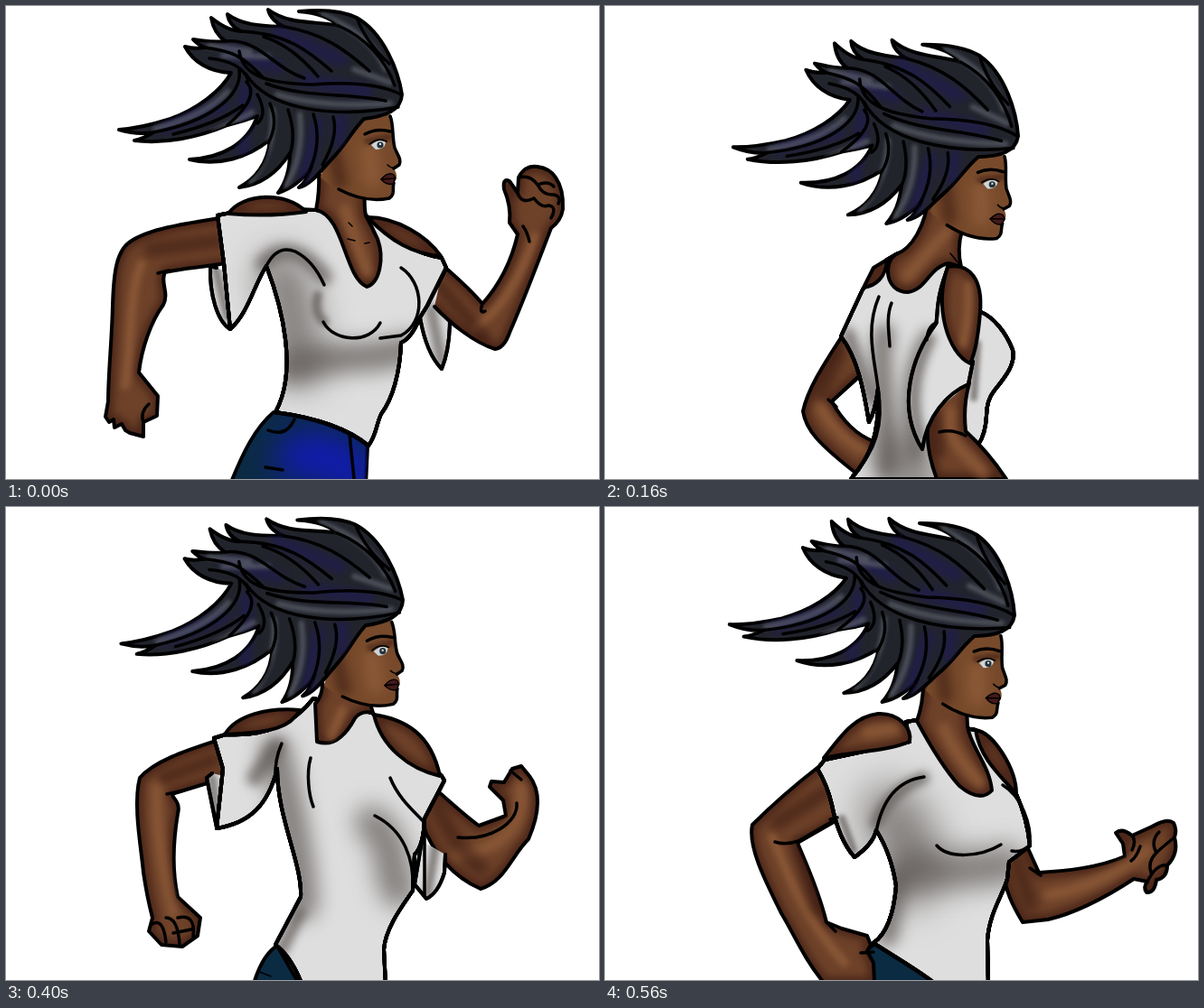
Animation, 656 px wide and 524 px high, one loop 0.64 s. Source, as an HTML page with a canvas:

```html
<!DOCTYPE html>
<html lang="en">
<head>
<meta charset="utf-8">
<title>Runner</title>
<style>
html, body { margin: 0; width: 100%; height: 100%; overflow: hidden; background: #fff; }
canvas { display: block; }
</style>
</head>
<body>
<canvas id="stage" width="656" height="524"></canvas>
<script>
const W = 656, H = 524, STEP = 80;
const stage = document.getElementById('stage').getContext('2d');

// Part codes: s skin, f face, w shirt, b jeans, n hair, l line, t thin line, v eye, r lips;
// shades g grey, h skin glow, d skin shadow, u blue, k violet, m sheen are clipped to the part before them.
const FILL = { s: '#6e4229', f: '#774a2b', w: '#dedede', b: '#0b2b43', n: '#22242c', r: '#45191a' };
const SHADE = { g: '#5d5855', h: '#95603c', d: '#32150f', u: '#1515df', k: '#221c55', m: '#62656f' };

const highArm = `sM484,288C500,302 516,316 527,330C543,312 558,288 566,253L557,240Q559,222 551,203Q549,190 557,194L566,207L567,190Q574,176 588,178Q602,180 608,190Q617,203 616,225Q614,238 603,246C592,275 572,328 557,362Q551,379 541,380C518,373 492,352 474,333
h9M520,355C545,340 570,300 585,255
d14M480,310L530,368
lM527,330Q523,342 530,338
lM566,207Q570,220 584,213M568,190Q580,187 588,198Q600,193 606,200M588,198Q594,210 606,209Q615,211 611,219M584,213Q592,224 600,221Q610,222 603,235M572,244Q577,251 579,261`;
const backArm = `sM236,235C205,240 160,246 139,260C122,270 119,295 118,332C117,372 113,408 113,438L110,455L114,461L119,458L120,467L128,463L132,470L137,473L152,477L152,461L167,454L168,432L147,406C150,380 160,350 174,331C181,318 170,305 176,295C196,290 215,290 242,285
h10M150,285C135,320 140,370 132,420
d16M160,270L235,260
lM168,296L180,293M152,461Q148,450 158,441`;

const frontReach = `bM248,530C262,495 275,468 296,450C335,455 375,467 400,487L398,530
u55M325,500Q360,490 385,520
lM290,470Q310,478 319,458M380,474L385,524M287,511L306,514
wM458,345C462,368 470,390 482,402C493,375 493,340 487,290
g12M470,335L482,395
${highArm}
${backArm}
wM233,290L226,288C225,320 234,350 248,358L258,300
g10M232,290L245,345
wM234,232C260,225 310,225 343,226L398,232C425,258 455,275 482,279L487,290L466,332L458,345C452,360 444,370 437,373C436,405 428,435 415,452C409,465 410,475 401,487C375,465 335,455 298,450C323,405 306,335 288,288C274,310 268,340 248,358L241,285Z
g54M305,300C325,350 318,385 325,395
g34M315,400C350,385 410,394 445,380
g18M285,285Q315,255 352,300
g10M352,350Q340,340 345,320
lM288,288Q300,264 320,272Q340,282 352,309M351,350C362,372 402,375 414,351M437,290C462,306 465,350 437,365L414,368
sM246,230C262,207 310,205 332,228Q290,234 246,230
sM400,234C432,234 466,255 481,277C450,275 425,260 400,234
sM346,185C347,205 345,216 343,226C374,232 374,300 399,311C413,307 419,280 411,258Q405,245 398,232Q396,222 397,208
h12M375,225Q385,260 400,295
tM379,240L383,244M378,258L386,260M397,263L402,262`;

const frontLift = `bM250,530C260,505 270,492 280,485L372,530
lM275,513Q295,518 304,500
sM470,320C485,340 497,355 505,362L510,342C515,326 535,325 546,340C556,355 559,372 557,385C556,405 548,425 535,440C505,438 475,415 458,384
d18M465,340Q490,400 530,430
lM505,362L492,355Q485,370 495,386Q510,412 549,411M512,346Q528,333 520,360M525,342Q544,345 530,375M545,350Q556,362 536,384M508,362L512,372M516,400Q516,414 530,421
h8M515,390Q540,390 545,365
sM234,270C205,283 165,302 147,313C138,325 142,370 150,405C158,440 170,460 178,485Q190,510 207,527L232,527C240,505 245,490 240,480L226,464L210,458L203,450C195,420 187,370 194,345Q200,332 242,318
h12M168,330C165,380 180,440 212,490
d16M175,320L230,295M180,445L200,490
lM215,497Q228,488 237,505M226,464L229,472
wM235,310L230,320L231,350L242,373L255,320
g10M235,320L242,370
wM447,380L440,395L447,420L458,385
wM236,268L242,262L327,234L350,230L415,243L446,287Q466,305 473,325C471,350 466,380 455,386L437,393C435,430 428,460 412,475Q396,492 399,530L372,530C345,515 310,500 276,486Q299,472 305,457C313,420 305,370 302,322C290,350 262,362 242,374Q246,320 236,268
g60M304,330C340,380 340,410 310,440
g34M320,410Q380,395 435,410
g18M300,320L328,288
lM302,322Q310,300 328,287M417,336C432,360 410,388 379,388M446,287C470,330 468,380 437,390
sM240,262C255,240 295,228 325,234C324,256 300,268 240,262
sM418,248C434,242 446,270 447,290C430,290 420,268 418,248
sM352,195Q350,216 352,232C362,265 385,300 405,323Q425,335 434,320C434,290 420,262 404,245Q394,243 396,222
h12M375,245Q400,270 420,310
tM381,260Q384,268 399,270M408,301L411,312`;

const backLift = `bM262,530L275,512C320,528 380,526 402,518L408,530
sM458,305C480,330 500,355 508,375C540,360 575,350 599,322L587,320L588,308L596,303L610,293L630,296L648,312L651,325L645,340L640,337L632,352L627,350L630,340C600,365 560,402 500,418C483,403 460,385 452,363
h12M510,395Q570,375 625,318
d18M465,340Q480,380 500,400
lM588,312L599,318M508,375L504,368M630,342Q638,333 637,326
sM249,278C220,300 190,325 178,345C185,375 215,420 240,440C260,460 275,475 287,489L316,435L300,432C270,425 265,410 250,385C240,365 235,350 217,350L249,340
h12M195,350C215,390 240,425 290,455
d16M205,330L245,300
lM217,350L245,341M277,458L291,468M302,443Q294,450 298,460
wM466,375L468,395L457,418L448,400
wM247,275L255,270L325,235L333,233L402,238L460,295L462,307C451,340 458,390 455,418L445,414C435,445 420,480 417,512C380,524 320,524 270,510C290,480 325,455 332,415C335,385 300,340 300,302C275,330 275,370 267,385C250,365 243,310 247,275
g30M302,290C310,340 340,380 336,420
g28M395,320C430,350 420,390 435,408
g14M258,300L268,370M340,300L350,360
g10M330,440L290,510
lM342,295C330,320 348,350 357,373M384,312C415,315 420,345 428,372Q438,405 455,418M300,292Q297,305 300,310
sM255,270C270,250 290,235 325,235C318,260 295,278 255,270
sM405,238C435,238 455,265 460,297C435,290 415,265 405,238
sM345,190C345,212 342,225 340,234C318,248 326,273 355,273C382,273 396,258 402,238L401,208
h12M375,220L370,260`;

const backTorso = `wM228,295L222,300L233,355L250,300
g10M228,300L234,350
wM486,385L485,405Q478,428 465,434L452,418L460,370
g10M475,375L466,430
wM230,256L243,252C290,255 320,238 340,212L405,228L482,298L485,303L463,345Q462,375 452,385L450,425C440,440 420,465 418,490L420,530L328,530Q315,497 298,485L326,432C328,395 300,345 300,290C290,330 270,350 233,356L240,290Z
g34M298,270C312,330 325,380 328,440
g38M405,350C435,375 420,400 435,425
g18M300,265L275,300
g14M325,450L305,490
lM305,262Q297,280 298,300M337,278C332,295 335,320 340,332M425,300C435,325 455,340 463,350M408,342C440,358 452,390 450,425M463,345L463,430
sM242,252C255,230 290,222 325,225C315,244 295,250 242,252
sM407,230C440,235 470,250 480,298C445,290 415,265 407,230
sM350,195Q350,210 342,218L344,260C365,267 378,249 386,234Q393,225 406,228L400,208
h10M372,225L360,255`;

const backHips = 'bM272,535C280,505 290,492 300,486L328,535';

const backReach = `${backHips}
tM278,514L293,520
sM472,310C490,325 505,340 523,353L553,342L550,325L535,310L537,304L551,305L560,290L570,287L579,298C592,315 590,340 578,368C560,385 552,415 525,423C500,412 475,390 460,350
h14M500,385C550,380 573,350 570,310
d18M475,330Q500,380 525,400
lM500,366C535,370 567,350 565,328M558,292L570,302
sM235,258C205,268 165,280 148,300C140,330 150,380 152,405C155,425 158,440 162,455L158,470L172,485L195,487L212,475L215,455L190,432C183,400 185,370 190,340C195,322 175,320 190,316L242,300
h12M167,310C165,360 175,410 185,450
d14M175,300L230,280
lM178,318L192,315M162,462Q174,455 177,482M177,455Q190,455 192,484M190,455Q210,450 207,476M185,472L205,468
${backTorso}`;

const passing = `sM268,372C250,400 230,430 225,455C228,475 240,490 292,530L303,488C285,482 268,465 257,444L288,415
h12M245,450Q260,480 295,500
d16M265,390L245,435
lM253,442L262,450M257,444L284,420
wM318,287L330,280L388,290L422,345C436,351 450,368 457,387C461,404 446,420 436,433Q428,443 428,460Q427,480 419,492L400,530L278,530C300,505 310,480 308,430Q305,455 298,467C292,430 285,395 267,372L291,320Z
g24M315,370C305,410 322,450 318,520
g50M325,500L350,525
g16M275,370L300,440
g22M365,375Q335,420 350,500
g8M418,380L414,440
lM309,328C293,365 305,400 308,430C315,470 305,500 280,526M323,335C317,350 320,365 321,383
sM365,460Q358,490 373,530L450,530Q430,500 405,477Q402,448 409,424
h12M388,455C380,490 410,505 425,525
d14M372,460L375,500
lM376,478Q390,474 405,482
wM388,290C370,330 375,350 372,358C345,395 328,450 357,497C362,460 385,435 408,425L413,400C390,370 380,330 388,295
g14M365,375Q337,430 355,485
lM373,357Q363,360 362,376
sM292,318L303,296L318,287C317,307 305,316 292,318
sM385,295C410,290 424,310 421,345Q418,385 410,402C385,390 370,340 385,295
h9M408,315Q410,350 402,380
sM364,215C361,250 345,275 328,281C313,290 316,323 341,323C361,321 364,296 386,291L400,295Q395,275 401,255
h12M385,255L340,305
tM388,280L398,292`;

const frontDrive = `bM288,492L300,483C325,498 350,515 366,530L300,530
sM462,365L480,405C510,403 545,400 575,387L573,373L565,361Q572,355 583,364L605,354Q622,344 629,350Q633,358 630,366Q635,384 622,397Q622,411 610,413Q608,428 599,427Q595,421 600,415L585,412C550,435 520,450 490,457L462,460C450,440 443,425 441,405
h12M490,430Q550,420 600,380
d18M455,390L470,440
lM470,400L482,408M583,364Q588,370 583,380M592,376Q588,388 582,392M613,360Q603,370 610,383M630,366Q615,378 610,383Q600,393 604,405M622,397Q610,395 600,415
sM236,288C205,312 175,340 163,352C158,375 175,410 195,450C210,475 220,500 242,527L298,527L297,505L290,492L294,485L290,475L262,467L245,460C235,420 220,390 213,372L260,345
h10M185,365C203,410 223,460 265,505
d16M190,350L245,315M215,375L235,445
lM188,371Q200,375 214,370L250,349M245,460L255,470M283,494L297,493
wM235,290L243,280L337,260L333,238L345,236L410,247L455,318Q467,345 470,375Q462,382 447,393L445,412C440,430 425,450 423,480L424,530L368,530C345,512 315,495 297,483Q318,468 322,420Q317,385 300,358C298,368 290,378 276,388C262,372 255,350 251,330Q246,308 235,290
g64M316,340C345,380 345,395 335,410
g24M325,410L312,475
g42M340,402Q390,405 445,396
g14M300,350Q315,315 352,300
g8M262,345L275,380
lM249,346L257,344M300,360Q310,305 353,299M367,375C380,390 415,388 438,374M440,308C460,320 472,350 470,375Q460,383 450,381
sM242,278C260,255 275,232 302,229C325,228 340,245 337,260C310,271 280,270 242,278
h12M290,250L320,245
sM410,247C430,250 455,290 455,318C440,300 415,280 410,247
sM352,195Q352,218 345,237C360,265 375,290 392,309Q415,328 428,314C425,285 404,265 401,243L400,220
h12M375,245Q390,280 415,305`;

// head: position of the forelock root and its tilt; at: body shift
const poses = [
  { head: [438, 98, 0], body: frontReach },
  { head: [443, 110, 0], body: frontLift },
  { head: [457, 144, .085], at: [-6, -6], body: passing },
  { head: [444, 103, 0], body: backLift },
  { head: [438, 98, 0], at: [0, -4], body: [backHips, highArm, backArm, backTorso].join('\n') },
  { head: [439, 103, -.03], body: backReach },
  { head: [463, 150, .092], body: passing },
  { head: [453, 120, .092], body: frontDrive }
];

const hairShape = 'M438,98C434,72 418,30 388,13C370,4 345,4 324,6C350,8 362,16 368,22C345,16 315,22 290,4C292,13 300,20 308,23C285,22 262,22 245,9C246,17 252,24 260,28C246,27 236,20 227,13C229,25 235,34 243,39C228,41 218,38 207,37Q214,44 220,46Q208,48 198,45C207,62 225,73 249,74C238,94 212,114 182,125C160,132 140,136 125,137Q145,143 163,140Q150,148 142,149C175,153 212,146 245,132Q262,128 278,122C268,152 240,168 203,170C235,178 268,168 292,148C290,175 275,192 258,201C285,198 302,182 314,163Q314,190 301,207C318,202 330,190 338,178Q333,194 324,201C338,198 352,178 360,170C375,155 383,138 396,125C420,122 437,116 438,98Z';
const head = `fM385,122L425,120C429,132 427,145 430,157C433,165 438,170 435,176L429,180C433,186 433,191 429,196C427,203 431,208 424,213C405,217 385,212 365,204L348,190L362,145
h20M402,160L405,192
d16M360,150L370,195
d7M400,150L424,145
lM425,122C429,132 427,145 430,157C433,165 438,170 435,176L429,180M429,196C427,203 431,208 424,213C405,217 385,212 368,203M397,142Q410,135 425,139
vM404,154Q413,146 420,151Q419,159 409,159Z
tM402,153Q412,145 421,150M422,176Q426,180 430,179
rM415,192Q423,183 429,187L431,191L428,197Q421,199 415,192Z
tM415,192L430,191
n${hairShape}
k14M245,50L300,68M300,28L370,60M240,110L175,134M265,90L262,160M345,130L330,190M370,125L368,150M330,82L400,95
m6M350,10Q405,32 420,70M225,44L270,50M300,98Q350,113 425,108M245,95Q220,122 165,136M295,115Q298,160 270,194M325,120Q330,165 310,198M240,55L290,56M385,70L425,85M230,140L272,118
lM258,50C262,80 295,86 340,87C380,84 415,87 437,98M265,75C290,115 360,125 434,112M288,86C330,102 380,96 420,105M243,39C280,36 295,68 330,80M220,46C250,50 262,55 285,80M225,58C245,60 262,66 268,82M260,28C310,30 335,50 360,72M285,34C310,42 330,60 345,78M308,23C350,30 375,48 402,72M368,22C398,35 420,60 430,88M388,13Q398,40 424,64M258,70C262,100 225,128 163,140M266,84Q282,100 245,132M278,98Q290,120 278,130M292,108Q302,130 290,152M312,115Q322,145 313,167M340,120Q350,150 336,182M362,123Q368,145 350,176M262,110Q235,130 185,142`;

function makeSheet() {
  const c = document.createElement('canvas');
  c.width = W;
  c.height = H;
  return c;
}

function ink(g, path, width) {
  g.strokeStyle = '#000';
  g.lineWidth = width;
  g.stroke(path);
}

function shade(g, clip, path, color, width, alpha, blur) {
  g.save();
  g.clip(clip);
  g.filter = `blur(${blur}px)`;
  g.globalAlpha = alpha;
  g.strokeStyle = color;
  g.lineWidth = width;
  g.stroke(path);
  g.restore();
}

function drawEye(g, path) {
  g.fillStyle = '#cdd5d8';
  g.fill(path);
  g.fillStyle = '#26333b';
  g.beginPath();
  g.arc(414, 154, 3.6, 0, 7);
  g.fill();
  g.fillStyle = '#e8eef0';
  g.fillRect(413, 152, 2, 2);
}

function drawParts(g, text) {
  let last;
  for (const row of text.split('\n')) {
    const [, kind, size, d] = row.match(/^([a-z])(\d*)(.*)$/);
    const path = new Path2D(d), width = +size;
    if (kind === 'l') ink(g, path, 3.5);
    else if (kind === 't') ink(g, path, 1.6);
    else if (kind === 'v') drawEye(g, path);
    else if (SHADE[kind]) {
      const alpha = kind === 'd' ? .5 : .7;
      shade(g, last, path, SHADE[kind], width, alpha, Math.max(2, width / 3));
      if (kind === 'g') ink(g, last, 4);
    } else {
      g.fillStyle = FILL[kind];
      g.fill(path);
      if (kind === 's') shade(g, path, path, '#35150f', 13, .6, 4);
      if (kind !== 'f') ink(g, path, kind === 'r' ? 1.4 : 4);
      last = path;
    }
  }
}

function render({ head: [x, y, tilt], at = [0, 0], body }) {
  const sheet = makeSheet(), g = sheet.getContext('2d');
  g.lineCap = g.lineJoin = 'round';
  g.fillStyle = '#fff';
  g.fillRect(0, 0, W, H);
  g.save();
  g.translate(...at);
  drawParts(g, body);
  g.restore();
  g.translate(x, y);
  g.rotate(tilt);
  g.translate(-438, -98);
  drawParts(g, head);
  return sheet;
}

const sheets = poses.map(render);

function play() {
  const i = Math.floor(performance.now() / STEP) % sheets.length;
  stage.drawImage(sheets[i], 0, 0);
  requestAnimationFrame(play);
}
play();
</script>
</body>
</html>
```
